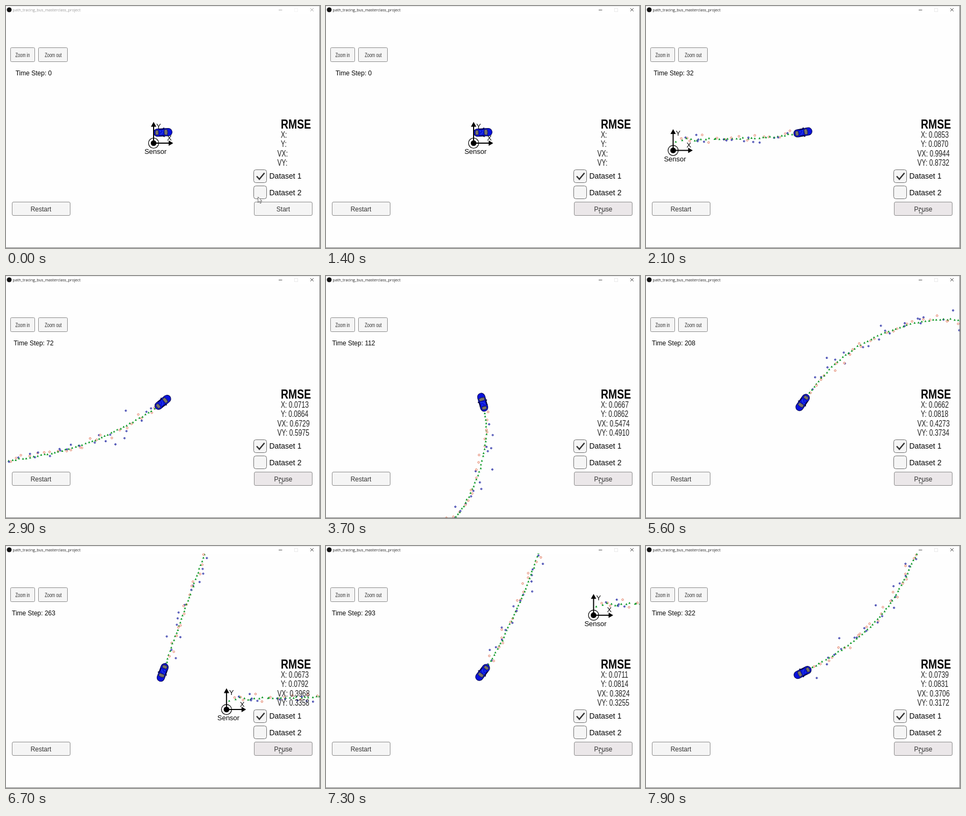
An HTML page for the animation above (8 s loop, 585 px wide and 450 px high).

```html
<!DOCTYPE html>
<html lang="en">
<head>
<meta charset="utf-8">
<title>Vehicle tracking</title>
<style>
  html, body { margin: 0; width: 100%; height: 100%; overflow: hidden; background: #fefefe; }
  svg { display: block; width: 585px; height: 450px; }
  text { font-family: "Liberation Sans", Arial, sans-serif; fill: #050505; }
  .btn rect, .box { fill: #f5f5f5; stroke: #8c8c8c; }
  .box { stroke: #707070; }
  .btn text { font-size: 12px; fill: #323232; text-anchor: middle; }
  .btn .narrow { font-size: 11px; }
  .label { font-size: 14px; }
  .rmse { font-size: 24px; font-weight: bold; }
  .value { font-size: 16px; fill: #222; }
  #step { font-size: 12px; text-anchor: middle; }
  #go.on rect { fill: #ebe7e9; }
  #bar { color: #999; }
  #bar.on { color: #222; }
  #bar text { font: 7.2px "Open Sans", "Noto Sans", sans-serif; fill: currentColor; }
  #bar path { stroke: currentColor; stroke-width: .8; fill: none; }
  #sensor text { font-size: 13px; }
  .laser { fill: #fff; stroke: #d8502c; stroke-width: .8px; }
  .radar { fill: #c9ccf2; stroke: #1a209c; stroke-width: .9px; }
  .core { fill: #1a209c; }
  .guess { fill: #0f9a28; }
</style>
</head>
<body>
<svg viewBox="0 0 585 450">
  <rect width="585" height="450" fill="#fefefe"/>
  <g id="trail"></g>

  <g id="car">
    <path d="M3-8.5l-2 2M3 8.5l-2-2" stroke="#06084a" stroke-width="2"/>
    <rect x="-17" y="-7" width="34.5" height="14" rx="7" fill="#0a12dc" stroke="#06084a"/>
    <path d="M-13-4.5Q-15 0-13 4.5L-8 4V-4Z" fill="#77736a" stroke="#111640" stroke-width=".8"/>
    <path d="M3-4.5V4.5L8 5.5Q10.5 0 8-5.5Z" fill="#77736a" stroke="#111640" stroke-width=".8"/>
    <path d="M-7-6H3M-7 6H3" stroke="#05062e" stroke-width="1.2"/>
    <path d="M-5-2h1M-2 2h1M0-3h1M-4 3h1M-1 0h1" stroke="#4f9cf0" stroke-width="1.2"/>
  </g>

  <g id="sensor">
    <circle r="9.5" fill="none" stroke="#000" stroke-width="1.2"/>
    <circle r="5.3"/>
    <path d="M0 0V-32M0 0H30" stroke="#000" stroke-width="2"/>
    <path d="M-5-30.5L0-39.5L5-30.5ZM28-5L36.5 0L28 5Z"/>
    <text x="5" y="-27.5">Y</text>
    <text x="25" y="-5.5">X</text>
    <text x="3.5" y="20" text-anchor="middle">Sensor</text>
  </g>

  <g class="btn"><rect x="8.5" y="77.5" width="45" height="26" rx="2"/>
    <text class="narrow" transform="translate(31 94.5) scale(.68 1)">Zoom in</text></g>
  <g class="btn"><rect x="60.5" y="77.5" width="54" height="26" rx="2"/>
    <text class="narrow" transform="translate(88 94.5) scale(.68 1)">Zoom out</text></g>
  <text id="step" x="51.5" y="129"></text>

  <text class="rmse" transform="translate(512 227.5) scale(.81 1)">RMSE</text>
  <g id="values"></g>

  <rect class="box" x="461.5" y="304.5" width="24" height="24" rx="4"/>
  <path d="M467 316.5L472 322L481.5 310.5" fill="none" stroke="#333" stroke-width="2.5"/>
  <text class="label" x="490.5" y="320.5">Dataset 1</text>
  <rect class="box" x="461.5" y="334.5" width="24" height="24" rx="4"/>
  <text class="label" x="490.5" y="351.5">Dataset 2</text>

  <g class="btn"><rect x="11.5" y="364.5" width="108" height="25" rx="2.5"/>
    <text x="65" y="381.5">Restart</text></g>
  <g class="btn" id="go"><rect x="462.5" y="364.5" width="108" height="25" rx="2.5"/>
    <text x="516.5" y="381.5"></text></g>

  <rect width="585" height="14" fill="#fff"/>
  <g id="bar">
    <circle cx="6" cy="7" r="4.5" fill="#111"/>
    <text x="12.5" y="9.8">path_tracing_bus_masterclass_project</text>
    <path d="M508 7.5h6.5M567 4l6 6M573 4l-6 6"/>
    <path d="M537.5 4.5h6v6h-6z" opacity=".12"/>
  </g>
  <path d="M0 .5H585" stroke="#e2e2e2"/>
  <path d="M0 449.5H584.5V0" fill="none" stroke="#808080"/>

  <path id="cursor" d="M0 0V10.5L2.5 8.3L4.2 12L5.8 11.2L4.2 7.7H7.5Z" fill="#fff" stroke="#444" stroke-width=".8"/>
</svg>

<script>
const LOOP = 8000, FRAME = 100;
const CLICK = 1000, DEPART = 1446, STEPS_PER_MS = .0501, LAST = 322;
const CENTER = [292, 235];

// Route relative to the sensor, one point every SPAN steps
const SPAN = 27;
const ROUTE = [
  [17, -20], [208, -28], [380, -75], [521, -176], [569, -353], [476, -518], [300, -580],
  [122, -522], [0, -378], [-72, -202], [-137, -25], [-223, 126], [-375, 231], [-560, 286]
];

// Readouts known at a few steps
const KNOWN = [32, 153, 263, 322];
const ERRORS = {
  X: [.0853, .0644, .0673, .0739],
  Y: [.0870, .0861, .0792, .0831],
  VX: [.9944, .4751, .3968, .3706],
  VY: [.8732, .4304, .3358, .3172]
};

const $ = id => document.getElementById(id);
const clamp = (v, a, b) => Math.min(b, Math.max(a, v));

function add(parent, tag, attrs) {
  const el = document.createElementNS("http://www.w3.org/2000/svg", tag);
  for (const k in attrs) el.setAttribute(k, attrs[k]);
  return parent.appendChild(el);
}

// Catmull-Rom through the route
function routeAt(s) {
  const end = ROUTE.length - 1, i = clamp(Math.floor(s / SPAN), 0, end - 1);
  const u = s / SPAN - i, u2 = u * u, u3 = u2 * u;
  const slope = (j, c) => {
    const lo = Math.max(0, j - 1), hi = Math.min(end, j + 1);
    return (ROUTE[hi][c] - ROUTE[lo][c]) / (hi - lo);
  };
  return [0, 1].map(c =>
    ROUTE[i][c] * (2 * u3 - 3 * u2 + 1) + ROUTE[i + 1][c] * (3 * u2 - 2 * u3) +
    slope(i, c) * (u3 - 2 * u2 + u) + slope(i + 1, c) * (u3 - u2));
}

function headingAt(s) {
  const [x0, y0] = routeAt(s - .5), [x1, y1] = routeAt(s + .5);
  return Math.atan2(y1 - y0, x1 - x0) * 180 / Math.PI;
}

// The sum of squared errors grows evenly between the known values
function errorAt(name, s) {
  const i = Math.max(0, KNOWN.findLastIndex((k, j) => k <= s && j < KNOWN.length - 1));
  const sum = j => ERRORS[name][j] ** 2 * KNOWN[j];
  const u = (s - KNOWN[i]) / (KNOWN[i + 1] - KNOWN[i]);
  return Math.sqrt((sum(i) + (sum(i + 1) - sum(i)) * u) / s);
}

let seed = 41;
function random() {
  seed = (seed * 1664525 + 1013904223) % 4294967296;
  return seed / 4294967296;
}
const noise = sd => (random() + random() + random() - 1.5) * 2 * sd;

function addMarks(s) {
  const [x, y] = routeAt(s), g = add($("trail"), "g", {});
  if (s % 2) {
    add(g, "circle", { class: "laser", cx: x + noise(4), cy: y + noise(4), r: 1.7 });
  } else {
    const r = Math.hypot(x, y) + noise(8), a = Math.atan2(y, x) + noise(.03);
    const cx = r * Math.cos(a), cy = r * Math.sin(a);
    add(g, "circle", { class: "radar", cx, cy, r: 1.5 });
    add(g, "circle", { class: "core", cx: cx - .5, cy, r: .7 });
  }
  const sd = .5 + 2 * Math.exp(-s / 10);
  add(g, "path", { class: "guess", d: `M${x + noise(sd)} ${y + noise(sd) - 2}l2 3.7h-4z` });
  return { s, g };
}

const marks = Array.from({ length: LAST }, (_, i) => addMarks(i - 1));

const values = Object.keys(ERRORS).map((name, i) => {
  const x = name.length > 1 ? 505.5 : 512, y = 245 + 17.3 * i;
  const el = add($("values"), "text", { class: "value", transform: `translate(${x} ${y}) scale(.76 1)` });
  return { name, el };
});
const goText = $("go").querySelector("text");

function draw(t) {
  const s = clamp(Math.floor((t - DEPART) * STEPS_PER_MS), 0, LAST);
  const [x, y] = routeAt(s), on = t >= CLICK;
  const shift = `translate(${CENTER[0] - x} ${CENTER[1] - y})`;
  $("trail").setAttribute("transform", shift);
  $("sensor").setAttribute("transform", shift);
  $("car").setAttribute("transform", `translate(${CENTER}) rotate(${headingAt(s)})`);
  for (const m of marks) m.g.style.display = m.s < s - 2 ? "" : "none";

  $("step").textContent = "Time Step: " + s;
  for (const { name, el } of values) {
    el.textContent = name + ":" + (s ? " " + errorAt(name, s).toFixed(4) : "");
  }
  goText.textContent = on ? "Pause" : "Start";
  $("go").classList.toggle("on", on);
  $("bar").classList.toggle("on", on);

  const p = clamp(t / 500, 0, 1);
  $("cursor").setAttribute("transform", `translate(${469.5 + 40 * p} ${355 + 20 * p})`);
}

function tick() {
  draw(Math.floor(performance.now() % LOOP / FRAME) * FRAME);
  requestAnimationFrame(tick);
}
tick();
</script>
</body>
</html>
```
